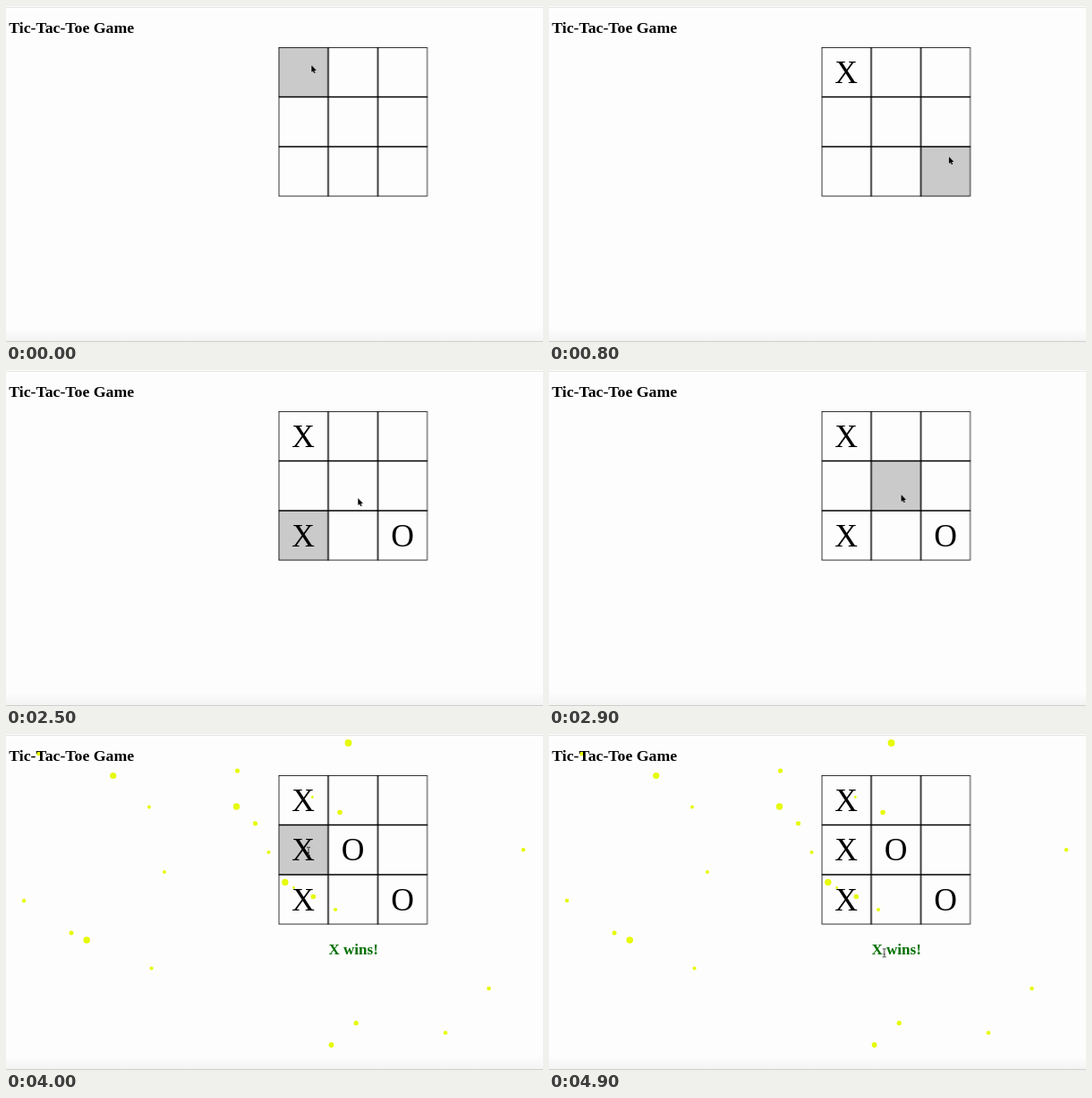
These frames come from a looping animation (600x375 px, 5000 ms). An HTML page:

```html
<!DOCTYPE html>
<html lang="en">
<head>
<meta charset="utf-8">
<title>Tic-Tac-Toe Game</title>
<style>
  html, body { margin: 0; width: 100%; height: 100%; overflow: hidden; background: #fdfdfd; }
  svg { display: block; width: 600px; height: 375px; }
  text { font-family: "Liberation Serif", "Times New Roman", serif; }
  .bold { font-weight: bold; font-size: 17.76px; }
  .wins { font-size: 17px; fill: #007000; text-anchor: middle; }
  .marks { font-size: 35.52px; text-anchor: middle; }
  .confetti { fill: #e6fa0a; }

  .turn, .hover, .cursor, .arrow, .beam { animation: 5s step-end infinite; }

  /* Moves appear one after another and clear when the loop restarts */
  .turn { opacity: 0; }
  .t1 { animation-name: turn1; }
  .t2 { animation-name: turn2; }
  .t3 { animation-name: turn3; }
  .t4 { animation-name: turn4; }
  .t5 { animation-name: turn5; }
  @keyframes turn1 { 8% { opacity: 1; } }
  @keyframes turn2 { 28% { opacity: 1; } }
  @keyframes turn3 { 46% { opacity: 1; } }
  @keyframes turn4 { 64% { opacity: 1; } }
  @keyframes turn5 { 80% { opacity: 1; } }

  .hover { fill: #cacaca; animation-name: hover; }
  @keyframes hover {
    0% { transform: translate(0, 0); }
    14% { transform: translate(55.5px, 55.5px); }
    16% { transform: translate(111px, 111px); }
    36% { transform: translate(55.5px, 111px); }
    38% { transform: translate(0, 111px); }
    52% { transform: translate(55.5px, 55.5px); }
    72% { transform: translate(0, 55.5px); opacity: 1; }
    90% { transform: translate(0, 111px); opacity: 1; }
    92% { transform: translate(55.5px, 111px); opacity: 1; }
    94%, 100% { transform: translate(55.5px, 111px); opacity: 0; }
  }

  .cursor { animation-name: cursor; }
  @keyframes cursor {
    0% { transform: translate(341.3px, 66px); }
    12% { transform: translate(350px, 76px); }
    14% { transform: translate(412px, 138px); }
    16% { transform: translate(446.8px, 168px); }
    18% { transform: translate(446.5px, 169px); }
    20% { transform: translate(446px, 169.5px); }
    34% { transform: translate(398.3px, 181px); }
    36% { transform: translate(355px, 184px); }
    38% { transform: translate(338px, 184px); }
    40% { transform: translate(335px, 184px); }
    50% { transform: translate(393.3px, 143px); }
    52% { transform: translate(394px, 140px); }
    56% { transform: translate(393.5px, 139px); }
    60% { transform: translate(393px, 138.5px); }
    68% { transform: translate(384px, 136px); }
    70% { transform: translate(355.3px, 133px); }
    72% { transform: translate(340px, 131.5px); }
    74% { transform: translate(338px, 131px); }
    86% { transform: translate(341px, 138px); }
    88% { transform: translate(349px, 158px); }
    90% { transform: translate(359px, 184px); }
    92% { transform: translate(367px, 213px); }
    94% { transform: translate(370px, 241px); }
    96% { transform: translate(371px, 250px); }
    98%, 100% { transform: translate(374.6px, 244.3px); }
  }

  /* The pointer is a text beam while it rests on a letter */
  .beam { opacity: 0; animation-name: beam; }
  .arrow { animation-name: arrow; }
  @keyframes beam {
    8%, 28%, 46%, 64%, 80%, 98% { opacity: 1; }
    12%, 34%, 50%, 70%, 86% { opacity: 0; }
  }
  @keyframes arrow {
    8%, 28%, 46%, 64%, 80%, 98% { opacity: 0; }
    12%, 34%, 50%, 70%, 86% { opacity: 1; }
  }
</style>
</head>
<body>
<svg viewBox="0 0 600 375">
  <defs>
    <linearGradient id="shade" x1="0" y1="0" x2="0" y2="1">
      <stop offset="0" stop-color="#fdfdfd"/>
      <stop offset="1" stop-color="#f3f3f3"/>
    </linearGradient>
  </defs>
  <rect width="600" height="375" fill="#fdfdfd"/>
  <rect y="1" width="600" height="1" fill="#e6e6e6"/>
  <rect y="360" width="600" height="14" fill="url(#shade)"/>
  <rect y="374" width="600" height="1" fill="#cfcfcf"/>

  <g transform="translate(304.5 46)">
    <rect class="hover" width="55.5" height="55.5"/>
    <g fill="none" stroke="#000">
      <rect x=".4" y=".4" width="165.7" height="165.7" stroke-width=".8"/>
      <path d="M55.5 0v166.5M111 0v166.5M0 55.5h166.5M0 111h166.5" stroke-width="1.48"/>
    </g>
  </g>

  <g class="confetti turn t5" id="confetti"></g>

  <text class="bold" x="3.2" y="30">Tic-Tac-Toe Game</text>
  <g class="marks">
    <text class="turn t1" x="332" y="85.7">X</text>
    <text class="turn t2" x="443.2" y="196.7">O</text>
    <text class="turn t3" x="332" y="196.7">X</text>
    <text class="turn t4" x="387.7" y="141.2">O</text>
    <text class="turn t5" x="332" y="141.2">X</text>
  </g>
  <text class="bold wins turn t5" x="388.2" y="246">X wins!</text>

  <g class="cursor">
    <path class="arrow" d="M0 0V8L1.8 6.4 3 9.2 4.4 8.6 3.2 5.9H5.6Z" stroke="#fff" stroke-width=".7" paint-order="stroke"/>
    <path class="beam" d="M-2-4.8Q0-4.8 0-3.6Q0-4.8 2-4.8M0-3.6V3.6M-2 4.8Q0 4.8 0 3.6Q0 4.8 2 4.8M-1 1.4H1" fill="none" stroke="#222" stroke-width=".9"/>
  </g>
</svg>
<script>
  // x, y, radius
  const dots = [
    [382.5, 10, 3.9], [36.5, 22, 2.4], [119.7, 46.5, 3.6], [258.5, 41, 2.6],
    [160, 81.5, 2], [257.5, 81, 3.7], [278.5, 99.8, 2.6], [293.5, 132, 2],
    [177, 154, 2], [20, 186, 2.2], [73, 222, 2.5], [90.2, 230, 3.8],
    [162.5, 261.5, 2.1], [311.8, 165.5, 3.7], [343.3, 181.5, 2.8], [368, 196, 2.1],
    [373, 87.5, 2.8], [342.3, 70.5, 1.4], [321.5, 171.5, 1.4], [578, 129.3, 2.2],
    [539.5, 284, 2.3], [391.2, 322.7, 2.6], [363.5, 347, 2.9], [491, 333.5, 2.3]
  ];
  document.getElementById("confetti").innerHTML = dots
    .map(([x, y, r]) => `<circle cx="${x}" cy="${y}" r="${r}"/>`)
    .join("");
</script>
</body>
</html>
```
